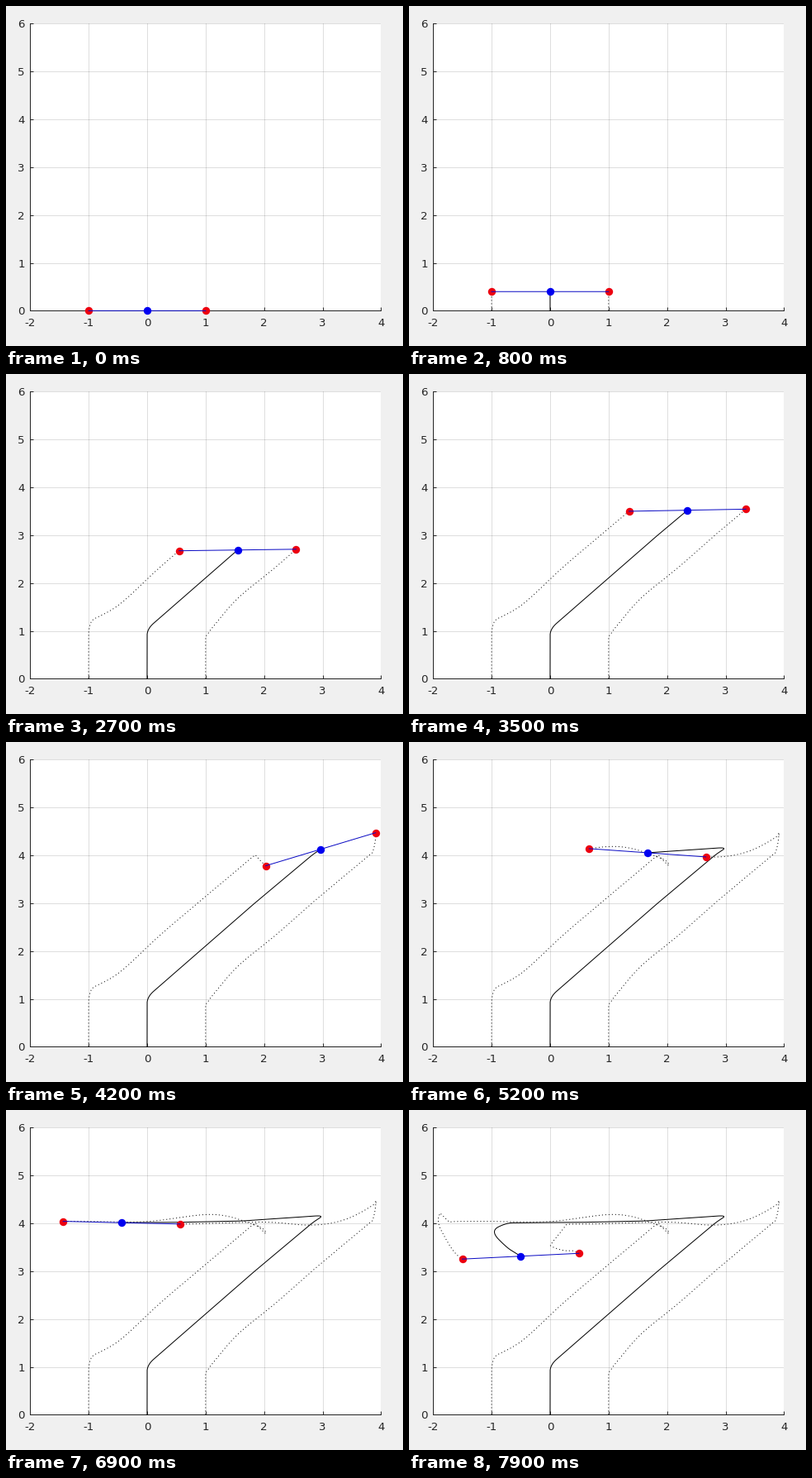
A matplotlib script that plays this animation: 481x411 px, repeating every 8000 ms.

```python
import numpy as np
import matplotlib.pyplot as plt
from matplotlib.animation import FuncAnimation

W, H, DPI = 481, 411, 64
PX = 72 / DPI  # points per pixel
STEP, FRAMES = 100, 80
FINE = 20  # trail samples per frame
INK = "#262626"

# corners of the route: time in frames, x, y
ROUTE = np.array([
    (5, 0, 0), (12.8, 0, 1.04), (29, 1.765, 2.922), (40, 2.835, 4.02),
    (42.7, 3.02, 4.165), (52, 1.66, 4.05), (60, 0.682, 4.022),
    (71.5, -0.745, 4.01), (73.6, -1.02, 3.84), (75.6, -0.745, 3.496),
    (82, -0.29, 3.15),
]).T
HELD = {14, 23, 28, 30, 62, 66, 70, 77}  # frames that repeat the one before


def rounded(t, values, reach=1):
    """Follow straight legs, averaged over a short time to round the corners."""
    shifts = np.linspace(-reach, reach, 41)
    return np.mean([np.interp(t + s, ROUTE[0], values) for s in shifts], axis=0)


def swing(t, peak, size, half, rest, rise=1.7):
    """Kick up to a peak, then a damped swing that settles at rest."""
    u = np.maximum(t - peak, 0)
    kick = np.clip((t - peak + rise) / rise, 0, 1)
    fade = np.exp(-u / (0.7 * half)) * np.cos(np.pi * u / half)
    return size * kick * fade + rest * (1 - np.exp(-u / 4))


t = np.arange(FRAMES * FINE) / FINE
centre = np.array([rounded(t, ROUTE[1]), rounded(t, ROUTE[2])])
tilt = (swing(t, 13, -0.145, 6.4, 0.022)
        + swing(t, 42, 0.33, 9.2, -0.045)
        + swing(t, 73, -0.31, 7, 0))
arm = np.array([np.cos(tilt), np.sin(tilt)])
left, right = centre - arm, centre + arm

fig = plt.figure(figsize=(W / DPI, H / DPI), dpi=DPI, facecolor="#f0f0f0")
x0, x1, top, bottom = 29.2, 454.4, 21.2, 368.4
ax = fig.add_axes([x0 / W, 1 - bottom / H, (x1 - x0) / W, (bottom - top) / H])
ax.set(xlim=(-2, 4), ylim=(0, 6))
ax.set_xticks(range(-2, 5), [str(v) for v in range(-2, 5)])
ax.set_yticks(range(7), [str(v) for v in range(7)])
ax.set_axisbelow(True)
ax.grid(color=INK, alpha=0.15, lw=PX)
ax.tick_params(direction="in", length=4 * PX, width=PX, color=INK,
               labelcolor=INK, labelsize=13.33 * PX, labelfontfamily="DejaVu Sans")
ax.tick_params(axis="x", pad=8.2 * PX)
ax.tick_params(axis="y", pad=6.3 * PX)
for side, spine in ax.spines.items():
    spine.set(visible=side in ("left", "bottom"), color=INK, linewidth=PX)


def line(color, z, **style):
    return ax.plot([], [], color=color, lw=PX, zorder=z, clip_on=False,
                   snap=False, **style)[0]


def dots(color, z):
    return ax.plot([], [], "o", color=color, ms=9.4 * PX, mew=0, zorder=z,
                   clip_on=False, snap=False)[0]


dotted = dict(linestyle=(0, (1, 3)), dash_capstyle="butt")
trails = [(line("black", 3, **dotted), left),
          (line("black", 3, **dotted), right),
          (line("black", 3), centre)]
ends = dots("#ec0010", 4)
bar = line("#0c0cc4", 5)
hub = dots("#0000f0", 6)


def draw(n):
    i = (n - (n in HELD)) * FINE
    for trail, path in trails:
        trail.set_data(*path[:, :i + 1])
    pair = np.column_stack((left[:, i], right[:, i]))
    ends.set_data(*pair)
    bar.set_data(*pair)
    hub.set_data(*centre[:, i:i + 1])
    return [trail for trail, _ in trails] + [ends, bar, hub]


anim = FuncAnimation(fig, draw, frames=FRAMES, interval=STEP,
                     repeat=True, repeat_delay=0, blit=False)
plt.show()
```
